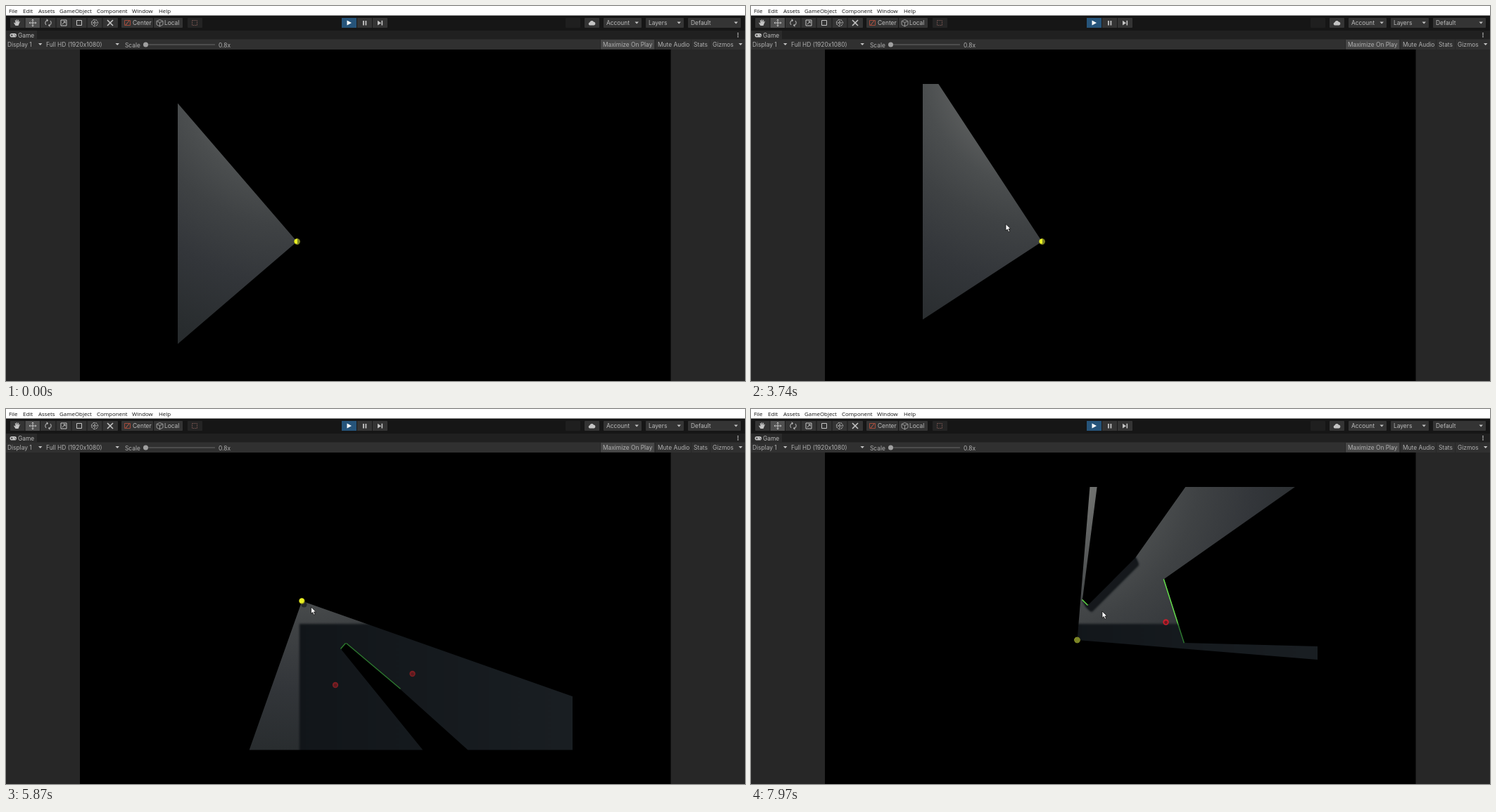
Recreate the animation shown at these times as an HTML page with a canvas. Size 1050 by 534 pixels, loop 8000 ms.

```html
<!DOCTYPE html>
<html lang="en">
<head>
<meta charset="utf-8">
<title>Field of view</title>
<style>
  html, body { margin: 0; width: 100%; height: 100%; overflow: hidden; background: #272727; }
  canvas, svg { position: absolute; left: 0; top: 0; width: 1050px; height: 534px; }
  text { font: 8.4px Inter, Roboto, sans-serif; fill: #bcbcbc; }
  .menu text { font: 7.9px "Open Sans", "Noto Sans", sans-serif; fill: #111; }
  .row text { fill: #b0b0b0; }
  .line { fill: none; stroke: #c4c4c4; stroke-width: 1; }
  .btn { fill: #343434; }
  .ico { fill: #c4c4c4; }
</style>
</head>
<body>
<canvas id="view" width="1050" height="534"></canvas>
<svg viewBox="0 0 1050 534">
  <defs><path id="drop" class="ico" d="M0 0h5.4l-2.7 3z"/></defs>
  <rect width="1050" height="14" fill="#fff"/>
  <g class="menu">
    <text x="4" y="10">File</text><text x="24" y="10">Edit</text><text x="46" y="10">Assets</text>
    <text x="76" y="10">GameObject</text><text x="129" y="10">Component</text>
    <text x="179" y="10">Window</text><text x="217" y="10">Help</text>
  </g>

  <rect y="13.5" width="1050" height="21.5" fill="#161616"/>
  <g class="btn">
    <rect x="6" y="17" width="153" height="14" rx="1"/>
    <rect x="164" y="17" width="45" height="14" rx="1"/><rect x="210" y="17" width="41" height="14" rx="1"/>
    <rect x="258" y="17" width="21" height="14" rx="1" fill="#242424"/>
    <rect x="477" y="17" width="65" height="14" rx="1"/>
    <rect x="795" y="17" width="21" height="14" rx="1" fill="#1f1f1f"/>
    <rect x="822" y="17" width="21" height="14" rx="1"/><rect x="849" y="17" width="54" height="14" rx="1"/>
    <rect x="909" y="17" width="54" height="14" rx="1"/><rect x="969" y="17" width="75" height="14" rx="1"/>
  </g>
  <rect x="27" y="17" width="21" height="14" fill="#505050"/>
  <rect x="477" y="17" width="21" height="14" fill="#26547a"/>
  <path d="M27 17v14M48.500 17v14M71 17v14M93 17v14M115 17v14M137 17v14M498.500 17v14M520.500 17v14" stroke="#191919"/>

  <path class="ico" d="M13.500 28l-2.500-4 1-.6 1.500 1.400-.7-4.600 1-.2.9 3 .1-3.800h1.100l.4 3.700.9-3.300 1 .2-.4 3.600 1.200-1.900.9.5-2.400 6z"/>
  <g class="line">
    <path d="M38 19v10M33 24h10M36.700 20.300L38 19l1.300 1.300M36.700 27.700L38 29l1.300-1.300M34.300 22.700L33 24l1.300 1.300M41.700 22.700L43 24l-1.300 1.300"/>
    <path d="M57 27a4.200 4.200 0 0 1 2-7M63 21a4.200 4.200 0 0 1-2 7M57.500 18.800l2 1.200-1.200 2M62.500 29l-2-1.200 1.200-2"/>
    <path d="M78 20h8v8h-8zM80 26l4-4M81.500 22H84v2.500"/>
    <path d="M100.500 20.500h7v7h-7z"/>
    <path d="M121.500 24a4.500 4.500 0 1 1 9 0 4.500 4.500 0 1 1-9 0M126 21v6M123 24h6" stroke-dasharray="3 1"/>
    <path d="M144 20l8 8M152 20l-8 8" stroke-width="1.600"/>
    <path d="M168.500 20.500h8v7h-8z" stroke="#a34a3a"/><path d="M170 27l5-6" stroke="#c65b48"/>
    <path d="M214 21.500l4.500-2 4.500 2v5l-4.500 2.500-4.500-2.500zM214 21.500l4.500 2 4.500-2M218.500 23.500V29" stroke="#999"/>
    <path d="M264.500 20.500h7v7h-7z" stroke="#70504c" stroke-dasharray="2 1"/>
  </g>
  <path d="M484.500 20.500v7l6.500-3.500z" fill="#fff"/>
  <path class="ico" d="M507 21h1.800v6.500H507zM510.500 21h1.800v6.500h-1.800zM528 20.800v6.800l5-3.400zM533.500 20.800h1.600v6.800h-1.600z"/>
  <path class="ico" d="M829.500 27.500a2.200 2.200 0 0 1-.1-4.300 3 3 0 0 1 5.500-.8 2.600 2.600 0 0 1 .6 5.100z"/>
  <text x="180" y="27">Center</text><text x="225" y="27">Local</text>
  <text x="853" y="27">Account</text><text x="913" y="27">Layers</text><text x="973" y="27">Default</text>
  <use href="#drop" x="893.500" y="22.500"/><use href="#drop" x="953.500" y="22.500"/><use href="#drop" x="1034.500" y="22.500"/>

  <rect y="35" width="1050" height="12.500" fill="#202020"/>
  <rect y="35" width="44" height="12.500" fill="#2b2b2b"/>
  <rect x="5.500" y="39" width="9.500" height="5.600" rx="2.800" class="ico"/>
  <path d="M7 41.800h2.600M8.300 40.500v2.600M11.500 41h1M13 42.500h1" stroke="#2b2b2b" stroke-width=".9"/>
  <text x="17" y="45">Game</text>
  <path d="M1040 38v1.500M1040 40.500v1.500M1040 43v1.500" stroke="#c4c4c4" stroke-width="1.500"/>

  <g class="row">
    <rect y="47.500" width="1050" height="14.500" fill="#303030"/>
    <rect x="845" y="48" width="76" height="13.500" fill="#474747"/>
    <path d="M844.500 48v14M922.500 48v14M973.500 48v14M1000.500 48v14" stroke="#272727"/>
    <text x="2" y="57.500">Display 1</text><text x="57" y="57.500">Full HD (1920x1080)</text>
    <text x="169" y="58.500">Scale</text><text x="302" y="58.500">0.8x</text>
    <path d="M195 55h102" stroke="#686868"/><circle cx="198.500" cy="55" r="3.500" fill="#a0a0a0"/>
    <text x="848" y="57.500">Maximize On Play</text><text x="926" y="57.500">Mute Audio</text>
    <text x="977" y="57.500">Stats</text><text x="1004" y="57.500">Gizmos</text>
    <use href="#drop" x="46" y="53"/><use href="#drop" x="155.500" y="53"/><use href="#drop" x="1041" y="53"/>
  </g>
  <path id="cursor" d="M0 0v9.500l2.200-2 1.700 3.700 1.700-.8-1.700-3.500h3z" fill="#fff" stroke="#000" stroke-width=".7"/>
</svg>
<script>
const LOOP = 8000, RAD = Math.PI / 180, HALF = 45 * RAD;
const ctx = document.getElementById('view').getContext('2d');
const cursor = document.getElementById('cursor');

const FLOOR = [[244, 111], [805, 111], [805, 485.5], [244, 485.5]];
const WALLS = [
  [[471, 271], [538, 204], [546, 212], [479, 279]],
  [[476, 342], [483, 334], [560, 399], [553, 407]],
  [[587, 242], [597, 239], [626, 330], [616, 333]]
];
const ENEMIES = [[468, 393], [577.5, 377], [589.5, 303.5]];
const SHADE = { x: 417, y: 306 };

// Tracks: time, then values, joined by straight lines.
const PLAYER = [[0, 413.5, 335.5], [4900, 413.5, 335.5], [5310, 421.5, 308.5],
  [5850, 420.5, 273.5], [7080, 420.5, 273.5], [7900, 463.5, 329]];
const FACING = [[0, 184.3], [250, 184], [650, 148], [1430, 155], [2700, 174], [3740, 191.7],
  [4240, 222], [4800, 226], [5310, 217.4], [5870, 64.5], [7040, 8.5], [7970, -40.3]];
const MOUSE = [[0, 300, 545], [250, 300, 545], [650, 330, 372], [1430, 338, 356], [3740, 362, 310.5],
  [4400, 377, 288], [5310, 414.5, 286], [5870, 433.5, 282], [7040, 481, 270], [7970, 499, 288]];

function sample(track, t) {
  const i = track.findIndex(k => k[0] > t);
  if (i < 0) return track[track.length - 1].slice(1);
  const a = track[i - 1], b = track[i], f = (t - a[0]) / (b[0] - a[0]);
  return a.slice(1).map((v, j) => v + (b[j + 1] - v) * f);
}

function trace(c, points) {
  c.beginPath();
  points.forEach(p => c.lineTo(p[0], p[1]));
  c.closePath();
}

function disc(c, x, y, r, fill) {
  c.fillStyle = fill;
  c.beginPath();
  c.arc(x, y, r, 0, 7);
  c.fill();
}

const edges = shape => shape.map((p, i) => [p, shape[(i + 1) % shape.length]]);
const SEGMENTS = [FLOOR, ...WALLS].flatMap(edges);
const CORNERS = [FLOOR, ...WALLS].flat();

// The lit floor never changes, so it is painted once.
function paintFloor() {
  const canvas = document.createElement('canvas');
  canvas.width = 1050;
  canvas.height = 534;
  const c = canvas.getContext('2d');
  const glow = c.createRadialGradient(412, 92, 0, 412, 92, 560);
  [[0, '#8a8a86'], [.1, '#787976'], [.2, '#5e6060'], [.3, '#4b4e4f'], [.4, '#3f4244'],
   [.54, '#33363a'], [.72, '#282c2e'], [1, '#1f2427']].forEach(s => glow.addColorStop(...s));
  c.fillStyle = glow;
  c.fillRect(244, 111, 561, 375);

  c.filter = 'blur(1.5px)';
  c.fillStyle = '#15181c';
  for (let i = 0; i <= 10; i++) {
    trace(c, WALLS[0].map(([x, y]) => [x + i * .5, y + i]));
    c.fill();
  }
  disc(c, 452, 249, 3.5, '#2b2d2f');
  const dark = c.createLinearGradient(SHADE.x, 0, 805, 0);
  dark.addColorStop(0, '#111519');
  dark.addColorStop(1, '#191e22');
  c.fillStyle = dark;
  c.fillRect(SHADE.x, SHADE.y, 420, 220);
  return canvas;
}
const floor = paintFloor();

function castRay([px, py], angle) {
  const dx = Math.cos(angle), dy = Math.sin(angle);
  let near = 2000;
  for (const [a, b] of SEGMENTS) {
    const ex = b[0] - a[0], ey = b[1] - a[1], det = dx * ey - dy * ex;
    if (Math.abs(det) < 1e-9) continue;
    const ax = a[0] - px, ay = a[1] - py;
    const dist = (ax * ey - ay * ex) / det, along = (ax * dy - ay * dx) / det;
    if (dist > 0 && along >= 0 && along <= 1) near = Math.min(near, dist);
  }
  return [px + dx * near, py + dy * near];
}

function visibleArea(eye, facing) {
  const turns = [-HALF, HALF];
  for (const [x, y] of CORNERS) {
    const turn = Math.atan2(y - eye[1], x - eye[0]) - facing;
    const d = Math.atan2(Math.sin(turn), Math.cos(turn));
    turns.push(d - 1e-4, d + 1e-4);
  }
  const seen = turns.filter(d => Math.abs(d) <= HALF).sort((a, b) => a - b);
  return [eye, ...seen.map(d => castRay(eye, facing + d))];
}

// Faces turned away from the light, or lying in the shade, are dimmer.
function drawFaces(eye) {
  ctx.lineWidth = 2.8;
  for (const [a, b] of WALLS.flatMap(edges)) {
    const nx = b[1] - a[1], ny = a[0] - b[0];
    if ((eye[0] - a[0]) * nx + (eye[1] - a[1]) * ny <= 0) continue;
    if (nx > 0 && ny > 0) continue;
    const paint = ctx.createLinearGradient(0, SHADE.y - 3, 0, SHADE.y + 3);
    paint.addColorStop(0, '#62e048');
    paint.addColorStop(1, '#2b7a2c');
    ctx.strokeStyle = paint;
    ctx.beginPath();
    ctx.moveTo(...a);
    ctx.lineTo(...b);
    ctx.stroke();
  }
}

function drawEnemy([x, y]) {
  const shaded = y > SHADE.y;
  disc(ctx, x, y, 4.2, shaded ? '#7d1d22' : '#c81e2c');
  disc(ctx, x, y + .4, 2.3, shaded ? '#5a1a1e' : '#6e1820');
}

function drawPlayer([x, y]) {
  ctx.save();
  ctx.beginPath();
  ctx.arc(x, y, 4.2, 0, 7);
  ctx.clip();
  ctx.fillStyle = '#8a8a18';
  ctx.fillRect(x - 5, y - 5, 10, 10);
  disc(ctx, x - .5, y - .7, 3.6, '#eaf024');
  ctx.fillStyle = '#7b8426';
  ctx.fillRect(SHADE.x - 3, SHADE.y - 3, 400, 200);
  ctx.restore();
}

function frame() {
  const t = performance.now() % LOOP;
  const eye = sample(PLAYER, t), facing = sample(FACING, t)[0] * RAD;
  const [mx, my] = sample(MOUSE, t);

  ctx.fillStyle = '#272727';
  ctx.fillRect(0, 0, 1050, 534);
  ctx.fillStyle = '#000';
  ctx.fillRect(105, 62, 839.5, 472);

  ctx.save();
  trace(ctx, visibleArea(eye, facing));
  ctx.clip();
  ctx.drawImage(floor, 0, 0);
  disc(ctx, eye[0] + 3, eye[1] + 5, 4, 'rgba(12,15,18,.55)');
  drawFaces(eye);
  ENEMIES.forEach(drawEnemy);
  ctx.restore();

  drawPlayer(eye);
  cursor.setAttribute('transform', `translate(${mx} ${my})`);
  requestAnimationFrame(frame);
}
frame();
</script>
</body>
</html>
```
